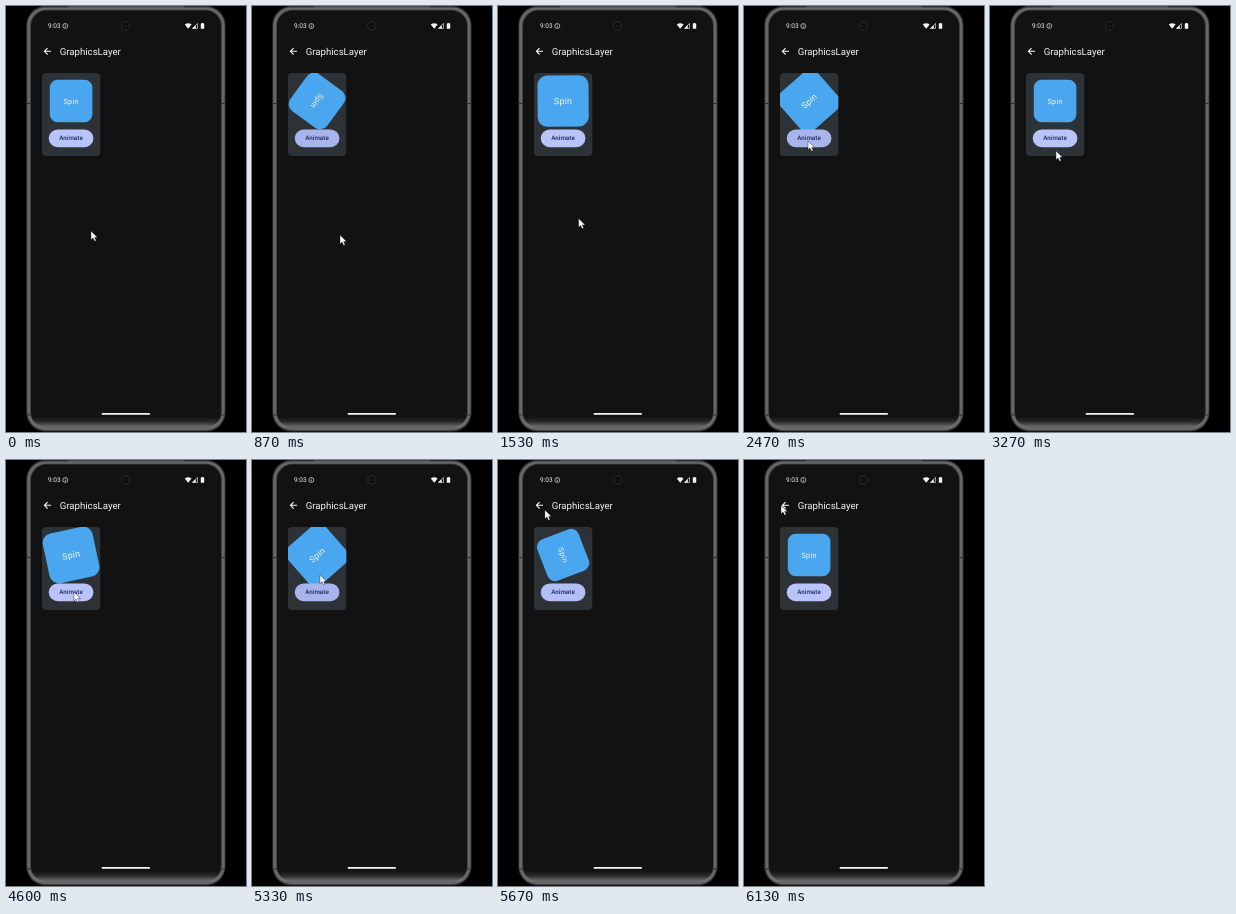
An HTML page that plays this animation: 240x426 px, repeating every 6190 ms.

```html
<!DOCTYPE html>
<html lang="en">
<head>
<meta charset="utf-8">
<title>GraphicsLayer</title>
<style>
  html, body { margin: 0; width: 100%; height: 100%; overflow: hidden; background: #000; }
  svg { display: block; width: 100%; height: 100%; }
  text { font-family: Roboto, Arial, sans-serif; fill: #f4f4f4; text-rendering: geometricPrecision; }
</style>
</head>
<body>
<svg viewBox="0 0 240 426">
  <defs>
    <clipPath id="cardClip"><rect x="36" y="67" width="58.3" height="83" rx="4"/></clipPath>
    <linearGradient id="glow" x2="0" y2="1">
      <stop stop-color="#777" stop-opacity="0"/>
      <stop offset=".45" stop-color="#777" stop-opacity=".25"/>
      <stop offset="1" stop-color="#777"/>
    </linearGradient>
  </defs>

  <!-- phone body -->
  <rect x="20.3" y="0" width="199.2" height="425.6" rx="19" fill="#303030"/>
  <rect x="21.2" y="1.4" width="197.4" height="422.8" rx="18" fill="#676767"/>
  <rect x="24.2" y="3.8" width="191.6" height="418" rx="16" fill="#3a3a3a"/>
  <rect x="25" y="4.6" width="190" height="416.8" rx="15.5" fill="#121212"/>
  <path d="M25 411H215Q215 421.6 201 421.8H39Q25 421.6 25 411Z" fill="url(#glow)"/>
  <path d="M62 1h116" stroke="#686868"/>
  <path d="M20 97.5h4.5M215.5 97.5h4.5M20 409h4.5M215.5 409h4.5" stroke="#2a2a2a"/>
  <circle cx="119.5" cy="20" r="5" fill="#1f1f1f"/>
  <circle cx="119.5" cy="20" r="3" fill="#0a0a0a"/>
  <path d="M117.6 20h3.8" stroke="#333" stroke-dasharray="1 .4"/>

  <!-- status bar -->
  <text x="42" y="22.3" font-size="6.5">9:03</text>
  <circle cx="59.3" cy="20" r="2.5" fill="none" stroke="#eee" stroke-width=".65"/>
  <path d="M59.3 18.5v.7M59.3 19.7v1.8" stroke="#eee" stroke-width=".7"/>
  <g fill="#f4f4f4">
    <path d="M178.8 18.6q3.4-2.8 6.8 0l-3.4 4.2z"/>
    <path d="M189.8 18.9v3.7h-3.6z"/>
    <path d="M191.5 17.4v5.1h-5z" fill="none" stroke="#f4f4f4" stroke-width=".6"/>
    <path d="M194.8 17.6h.9v-.7h1.6v.7h.9v5.2h-3.4z"/>
  </g>

  <!-- app bar -->
  <path d="M45 45.3h-6.6M41.6 42.1l-3.2 3.2l3.2 3.2" fill="none" stroke="#f4f4f4" stroke-width="1.1"/>
  <text x="53.7" y="48.8" font-size="9.65">GraphicsLayer</text>

  <!-- card -->
  <rect x="36" y="67" width="58.3" height="83" rx="4" fill="#2c3235"/>
  <g clip-path="url(#cardClip)">
    <g id="box">
      <rect x="-21.3" y="-21.3" width="42.6" height="42.6" rx="8" fill="#4aa7ef"/>
      <text y="2.6" font-size="7.4" letter-spacing=".2" text-anchor="middle">Spin</text>
    </g>
  </g>
  <rect x="42.8" y="123.4" width="44.6" height="17.8" rx="8.9" fill="#b9c4fb"/>
  <rect id="ripple" x="42.8" y="123.4" width="44.6" height="17.8" rx="8.9" fill="#1b2a60"/>
  <text x="65" y="134.2" font-size="6.3" font-weight="500" text-anchor="middle" style="fill:#1d2a5c">Animate</text>

  <rect x="95.6" y="407.1" width="48.4" height="1.7" rx=".85" fill="#f4f4f4"/>
  <path id="cursor" d="M0 0V8.8L2 7L3.6 10.3L5.1 9.6L3.7 6.4H6.5Z" fill="#fff" stroke="#111" stroke-width=".4"/>
</svg>
<script>
const LOOP = 6190, SPIN = 1000;
const taps = [577, 2283, 3830, 5143];
// time, x, y of the pointer tip
const path = [
  [0, 85, 225], [670, 85, 225], [870, 88, 229], [1130, 91, 256], [1330, 88, 251],
  [1930, 66, 136], [2300, 64, 135], [2670, 64, 135], [3000, 66, 145], [3270, 66, 145],
  [3750, 68, 132], [5200, 68, 132], [5330, 68, 115], [5750, 42, 35], [6130, 37, 45], [LOOP, 37, 45]
];
const [box, ripple, cursor] = ["box", "ripple", "cursor"].map(id => document.getElementById(id));
const clamp = v => Math.min(1, Math.max(0, v));
const bezier = (a, b, s) => 3 * (1 - s) * (1 - s) * s * a + 3 * (1 - s) * s * s * b + s * s * s;

// cubic-bezier(.4, 0, .2, 1)
function ease(t) {
  if (t <= 0 || t >= 1) return clamp(t);
  let lo = 0, hi = 1;
  for (let i = 0; i < 24; i++) {
    const mid = (lo + hi) / 2;
    if (bezier(.4, .2, mid) < t) lo = mid; else hi = mid;
  }
  return bezier(0, 1, lo);
}

function pointer(t) {
  const i = path.findIndex(p => p[0] > t);
  const [t0, x0, y0] = path[i - 1], [t1, x1, y1] = path[i];
  const k = (t - t0) / (t1 - t0);
  return [x0 + (x1 - x0) * k, y0 + (y1 - y0) * k];
}

function draw() {
  const t = performance.now() % LOOP;
  let p = 0, shade = 0;
  taps.forEach((tap, i) => {
    const age = t - tap;
    p += (i % 2 ? -1 : 1) * ease(age / SPIN);
    shade += clamp(age / 75) * clamp((600 - age) / 200);
  });
  box.setAttribute("transform", `translate(65.1 95) rotate(${360 * p}) scale(${1 + .2 * p})`);
  ripple.setAttribute("opacity", .1 * shade);
  cursor.setAttribute("transform", `translate(${pointer(t)})`);
  requestAnimationFrame(draw);
}
draw();
</script>
</body>
</html>
```
